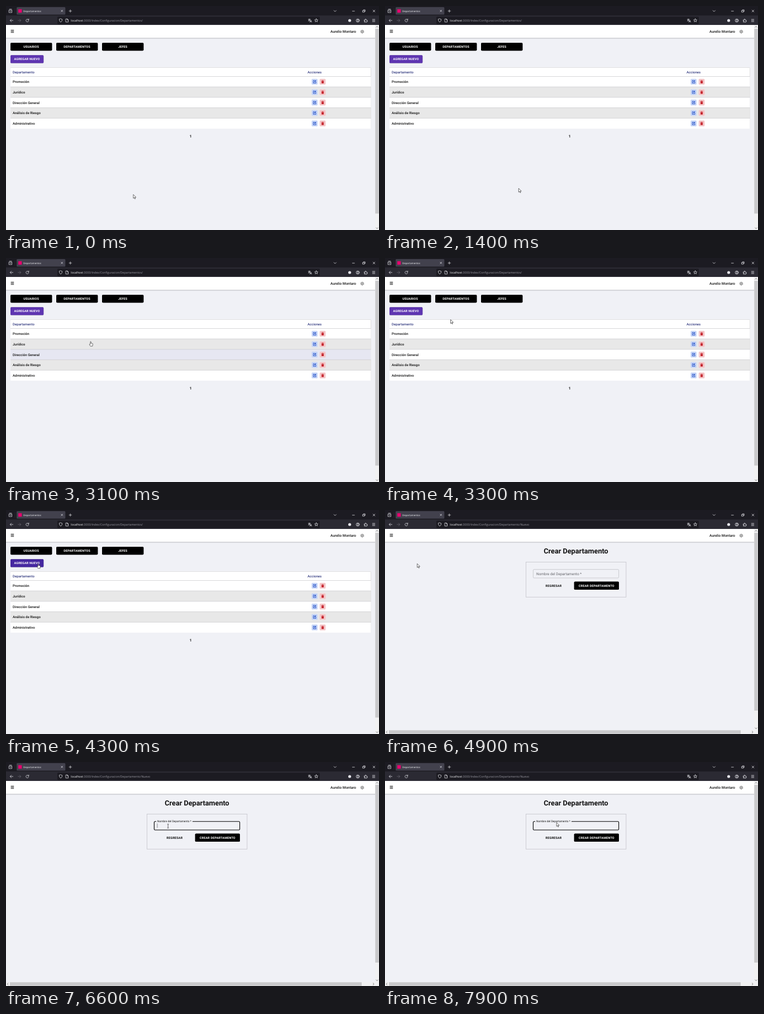
Write an HTML page that moves like this. It is 668x402 px and loops after 8000 ms.

```html
<!DOCTYPE html>
<html lang="es">
<head>
<meta charset="utf-8">
<title>Departamentos</title>
<style>
  html, body { margin: 0; width: 100%; height: 100%; overflow: hidden; background: #f0f1f6; }
  svg { display: block; width: 100%; height: 100%; }
  text { font-family: Roboto, sans-serif; font-size: 6.09px; font-weight: 500; fill: #111; text-rendering: geometricPrecision; }
  .ui { font-family: "Open Sans", "Noto Sans", sans-serif; font-weight: 400; fill: #fbfbfe; }
  .btn { font-size: 5.5px; font-weight: 600; letter-spacing: .155px; text-anchor: middle; }
  .light { fill: #fff; }
  .head { fill: #343c80; }
  .line { fill: none; stroke: #e4e4ea; stroke-width: .75; stroke-linecap: round; stroke-linejoin: round; }
  .lift { filter: drop-shadow(0 .8px .7px rgba(0,0,0,.4)); }
</style>
</head>
<body>
<svg viewBox="0 0 668 402" preserveAspectRatio="none">
  <defs>
    <g id="pen" fill="none" stroke="#1d4bc4" stroke-width=".85" stroke-linejoin="round">
      <path d="M.3-2.2H-2.3V2.4H2.3V0"/>
      <path d="M-.9 1 -.7-.3 1.9-2.9 2.9-1.9 .3.7Z" fill="#1d4bc4" stroke="none"/>
    </g>
    <path id="bin" fill="#c4232b" d="M-2.4-2.2H-1.1L-.7-2.7H.7L1.1-2.2H2.4V-1.5H-2.4ZM-2-1.1H2V2.2Q2 2.8 1.4 2.8H-1.4Q-2 2.8-2 2.2Z"/>
  </defs>

  <g id="chrome">
    <rect width="668" height="17" fill="#1c1b22"/>
    <rect y="17" width="668" height="17" fill="#2b2a33"/>
    <path d="M16.2 4V14" stroke="#3a3944" stroke-width=".5"/>
    <rect x="19" y="2" width="87.3" height="13.6" rx="1.6" fill="#42414d"/>
    <rect x="22" y="5.7" width="6.3" height="6.3" fill="#e5006d"/>
    <text class="ui" x="31" y="10.7" style="font-size:4.4px">Departamentos</text>
    <rect x="92" y="19.2" width="470" height="13.2" rx="1.6" fill="#1c1b22"/>
    <text class="ui" x="116.2" y="27.9" style="font-size:5.24px">localhost<tspan id="path" fill="#9b9aa3"></tspan></text>
    <g class="line">
      <path d="M5.6 7.2H10.6V11.8H5.6ZM6.2 5.7H10M7 9.2Q8.1 10.6 9.2 9.2"/>
      <path d="M98.8 7.4 101.6 10.2M101.6 7.4 98.8 10.2"/>
      <path d="M113 9H117.4M115.2 6.8V11.2"/>
      <path d="M587.2 8 589.3 10.1 591.4 8"/>
      <path d="M620.3 9.2H624.2M639 8H642V11H639ZM640.2 8V6.9H643.2V9.8H642M657.2 7.2 660.8 10.8M660.8 7.2 657.2 10.8"/>
      <path d="M12.6 26H7.4M9.6 23.7 7.3 26 9.6 28.3"/>
      <path d="M21.6 26H26.6M24.4 23.7 26.7 26 24.4 28.3" stroke="#686771"/>
      <path d="M40.3 24.6A2.5 2.5 0 1 0 40.7 26.6M40.8 23.2V25H39"/>
      <path d="M98 22.9 100.7 23.9Q100.9 27.4 98 29.1 95.1 27.4 95.3 23.9Z"/>
      <path d="M107.4 23.2H110L111.5 24.7V28.8H107.4ZM109.8 23.3V25H111.4"/>
      <path d="M541.4 24H545M543.2 23.2V24M544.4 24Q543.8 26.3 541.5 27.2M542 25Q543 26.6 544 26.9M544.3 29 545.8 25.2 547.3 29M544.8 27.8H546.8"/>
      <path d="M555.7 22.9 556.6 24.8 558.7 25 557.1 26.4 557.6 28.5 555.7 27.4 553.8 28.5 554.3 26.4 552.7 25 554.8 24.8Z"/>
      <circle cx="630" cy="26" r="2.9"/>
      <path d="M628.3 28.1Q630 26.4 631.7 28.1"/><circle cx="630" cy="25.1" r=".9"/>
      <path d="M641.8 25H643.3Q642.9 23.2 644 23.2T644.8 25H646.4V26.4Q647.5 26 647.5 27T646.4 27.6V28.9H641.8V27.4Q643.3 27.6 643.3 26.9T641.8 26.4Z"/>
      <path d="M656.3 24H660.7M656.3 26H660.7M656.3 28H660.7"/>
    </g>
    <circle cx="615.5" cy="26" r="2.6" fill="#e4e4ea"/>
  </g>

  <rect y="34" width="668" height="368" fill="#f0f1f6"/>
  <rect y="34" width="661" height="23.4" fill="#fff"/>
  <path d="M0 57.7H661" stroke="#b4b4b9" stroke-width=".8"/>
  <path d="M0 58.6H661" stroke="#dddde3" stroke-width=".9"/>
  <path d="M8.6 43H14.2M8.6 44.6H14.2M8.6 46.2H14.2M8.6 47.7H14.2" stroke="#4a4a4a" stroke-width=".95"/>
  <text x="627" y="48.2" text-anchor="end" style="font-size:6.4px">Aurelio Montaro</text>
  <g fill="none" stroke="#5b5b5b">
    <circle cx="638" cy="46" r="2.2" stroke-width=".7"/>
    <circle cx="638" cy="46" r="2.8" stroke-width=".9" stroke-dasharray="1.45 1.482"/>
    <circle cx="638" cy="46" r=".9" stroke-width=".6"/>
  </g>

  <g id="list"></g>

  <g id="form">
    <text x="342" y="77.6" text-anchor="middle" style="font-size:12.7px;font-weight:700">Crear Departamento</text>
    <rect x="252.4" y="93.5" width="179.4" height="62.8" fill="none" stroke="#c3c4ca" stroke-width=".8"/>
    <rect id="field" x="265.4" y="106.7" width="153.2" height="15.3" rx="1.6" fill="none"/>
    <rect id="notch" x="269" y="105.5" height="2.4" fill="#f0f1f6"/>
    <text id="label" style="font-size:6.5px;font-weight:400">Nombre del Departamento *</text>
    <path id="caret" d="M271 110.4V118.2" stroke="#222" stroke-width=".5"/>
    <text class="btn" x="302" y="137.8">REGRESAR</text>
    <rect class="lift" x="338.7" y="128.5" width="80.2" height="14.6" rx="1.7"/>
    <text class="btn light" x="378.8" y="137.8">CREAR DEPARTAMENTO</text>
  </g>

  <g id="bars">
    <rect x="661" y="34" width="7" height="368" fill="#f1f1f2"/>
    <rect id="thumb" x="661.3" y="41" width="6.4" fill="#c9c9cb"/>
    <path d="M662.8 38.2 664.5 36.4 666.2 38.2" class="line" style="stroke:#555"/>
    <path id="down" d="M662.8-.9 664.5.9 666.2-.9" class="line" style="stroke:#555"/>
    <g id="across">
      <rect y="395" width="668" height="7" fill="#f1f1f2"/>
      <rect x="7" y="395.3" width="630" height="6.4" fill="#c9c9cb"/>
      <path d="M4 396.8 2.2 398.5 4 400.2M657.3 396.8 659.1 398.5 657.3 400.2" class="line" style="stroke:#555"/>
    </g>
  </g>

  <g id="cursor">
    <path id="arrow" d="M0 0V6.9L1.6 5.4 2.7 7.9 3.8 7.4 2.7 5H4.9Z" fill="#fff" stroke="#111" stroke-width=".6" stroke-linejoin="round"/>
    <path id="hand" d="M-.6 5.2V.5Q0-.4.6.5V3L3.2 3.6Q4 3.8 3.9 4.7L3.3 8.4H-.4L-2.2 5.7Q-2.3 4.7-1.4 4.9Z" fill="#fff" stroke="#111" stroke-width=".6" stroke-linejoin="round"/>
    <path id="beam" d="M-1.4-3.6H-.4L0-3.2.4-3.6H1.4M0-3.2V3.2M-1.4 3.6H-.4L0 3.2.4 3.6H1.4" fill="none" stroke="#111" stroke-width=".65"/>
  </g>
</svg>
<script>
const $ = id => document.getElementById(id);
const LOOP = 8000, STEP = 100, PAGE = 4900;

const tabs = ['USUARIOS', 'DEPARTAMENTOS', 'JEFES'];
const rows = ['Promoción', 'Jurídico', 'Dirección General', 'Análisis de Riesgo', 'Administrativo'];
const top0 = 126.5, rowH = 18.72;

function button(id, x, y, w, label, fill) {
  return `<rect id="${id}" class="lift" x="${x}" y="${y}" width="${w}" height="14.3" rx="1.7" fill="${fill}"/>
    <text class="btn light" x="${x + w / 2}" y="${y + 9.1}">${label}</text>`;
}

function row(name, i) {
  const y = top0 + i * rowH, mid = y + rowH / 2;
  return `<rect x="8" y="${y}" width="645.5" height="${rowH}" fill="${i % 2 ? '#e8e8e8' : '#fff'}"/>
    <rect class="hover" x="8" y="${y}" width="645.5" height="${rowH}" fill="#e6e7f2" opacity="0"/>
    <path d="M8 ${y}H653.5" stroke="#c6c6ca" stroke-width=".7"/>
    <text x="12" y="${mid + 2.2}">${name}</text>
    <rect x="547.4" y="${mid - 5.2}" width="10.6" height="10.4" rx="1.5" fill="#c6d5f7"/>
    <use href="#pen" x="552.7" y="${mid}"/>
    <rect x="561.8" y="${mid - 5.2}" width="10.6" height="10.4" rx="1.5" fill="#f4c6c8"/>
    <use href="#bin" x="567.1" y="${mid}"/>`;
}

$('list').innerHTML =
  tabs.map((s, i) => button('tab' + i, 8 + i * 82, 66, 74.4, s, '#000')).join('') +
  button('add', 8, 88.3, 59.3, 'AGREGAR NUEVO', '#5e35b1') +
  `<rect class="lift" x="8" y="110.4" width="645.5" height="109.7" rx="1" fill="#fff"/>
   <text class="head" x="12" y="120.8">Departamento</text>
   <text class="head" x="540" y="120.8">Acciones</text>` +
  rows.map(row).join('') +
  '<text x="330.6" y="235.8" text-anchor="middle" style="font-size:6.6px;font-weight:700">1</text>';

const hovers = [...document.querySelectorAll('.hover')];

// time, x, y of the pointer
const track = [
  [0, 228, 338.3], [300, 228, 338.3], [400, 213.5, 338.3], [700, 213.5, 338.3],
  [1000, 224, 325.3], [1300, 224, 325.3], [1600, 270, 331], [2000, 361, 327], [2100, 361, 327],
  [2500, 248.5, 310.4], [2800, 212, 246], [3100, 151.6, 149.8], [3300, 117.5, 110.6],
  [3600, 90, 93], [3900, 77, 97], [4300, 57.7, 96.3], [5200, 57.7, 96.3],
  [5500, 120, 101], [5800, 235, 111], [6100, 286, 115], [6500, 286, 115],
  [6600, 290.2, 115], [6900, 309.5, 112], [7700, 309.5, 112], [7900, 307.2, 108.6]
];

const clamp = v => Math.max(0, Math.min(1, v));
const during = (t, a, b) => t >= a && t < b;
const show = (id, on) => $(id).setAttribute('visibility', on ? 'visible' : 'hidden');
const display = (id, on) => { $(id).style.display = on ? '' : 'none'; };

function pointAt(t) {
  let i = 1;
  while (i < track.length - 1 && track[i][0] < t) i++;
  const [t0, x0, y0] = track[i - 1], [t1, x1, y1] = track[i];
  const k = clamp((t - t0) / (t1 - t0));
  return [x0 + (x1 - x0) * k, y0 + (y1 - y0) * k];
}

function drawCursor(t) {
  const [x, y] = pointAt(t);
  const hand = during(t, 2900, 3300) || during(t, 4000, PAGE);
  const beam = during(t, 6000, 7800);
  $('cursor').setAttribute('transform', `translate(${x} ${y})`);
  show('hand', hand);
  show('beam', beam);
  show('arrow', !hand && !beam);
}

function drawList(t) {
  // the highlight trails the pointer by one row
  const active = during(t, 2900, 3300) ? 4 - (t - 2900) / STEP : -1;
  hovers.forEach((r, i) => r.setAttribute('opacity', i === active ? 1 : 0));
  const k = clamp((t - 3900) / 300), mix = (a, b) => Math.round(a + (b - a) * k);
  $('add').setAttribute('fill', `rgb(${mix(94, 69)},${mix(53, 39)},${mix(177, 160)})`);
}

function drawForm(t) {
  const p = clamp((t - 6100) / 300), k = 1 - (1 - p) ** 2;
  const focus = t >= 6200;
  $('field').setAttribute('stroke', focus ? '#000' : t >= 6000 ? '#222' : '#b9bac0');
  $('field').setAttribute('stroke-width', focus ? 1.1 : .7);
  $('notch').setAttribute('width', 65 * k);
  $('label').setAttribute('transform', `translate(271 ${116.8 - 8.9 * k}) scale(${1 - .25 * k})`);
  $('label').style.fill = focus ? '#111' : '#66676c';
  show('caret', t >= 6300 && Math.floor((t - 6300) / 500) % 2 === 0);
}

function draw(time) {
  const t = Math.floor((time % LOOP) / STEP) * STEP;
  const form = t >= PAGE;
  display('list', !form);
  display('form', form);
  display('across', form);
  $('path').textContent = ':3000/Index/Configuracion/' + (form ? 'Departamento/Nuevo' : 'Departamentos/');
  $('thumb').setAttribute('height', form ? 319 : 331.5);
  $('down').setAttribute('transform', `translate(0 ${form ? 391.8 : 398.8})`);
  if (form) drawForm(t); else drawList(t);
  if (!form) show('caret', false);
  drawCursor(t);
}

const start = performance.now();
function tick() {
  draw(performance.now() - start);
  requestAnimationFrame(tick);
}
tick();
</script>
</body>
</html>
```
